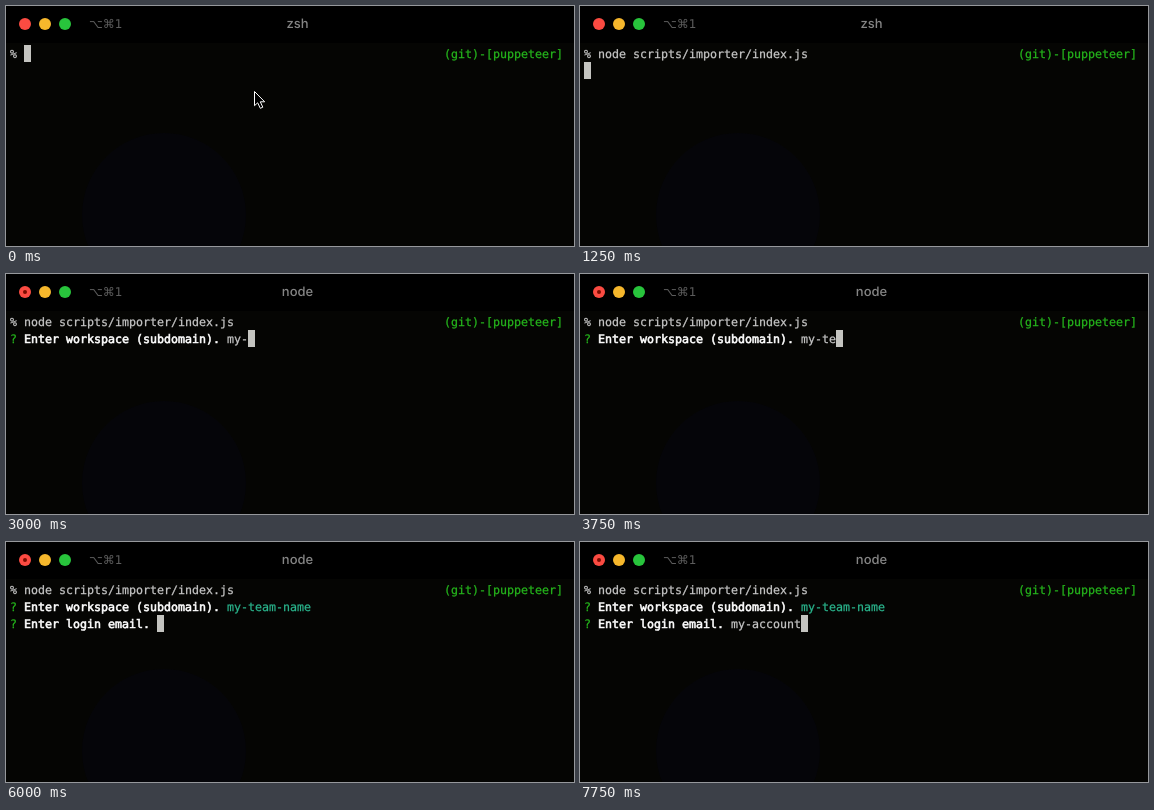
These frames come from a looping animation (568 px wide and 240 px high, 8 s). An HTML page:

```html
<!DOCTYPE html>
<html lang="en">
<head>
<meta charset="utf-8">
<title>Terminal session</title>
<style>
  html, body { margin: 0; width: 100%; height: 100%; overflow: hidden; background: #000; }
  svg { display: block; width: 100vw; height: 100vh; }
  text { white-space: pre; text-rendering: geometricPrecision; }
  .term { font: 11.63px "DejaVu Sans Mono", monospace; }
  .term text { fill: #c7c7c7; stroke: #c7c7c7; stroke-width: .25px; }
  .term .bold { fill: #fff; stroke: #fff; stroke-width: .6px; }
  .term .green { fill: #25b51c; stroke: #25b51c; }
  .term .teal { fill: #2ab48c; stroke: #2ab48c; }
  .bar { font: 500 13px Inter, sans-serif; fill: #858585; text-anchor: middle; }
  .keys { font: 12px "DejaVu Sans", sans-serif; fill: #5c5c5c; }
</style>
</head>
<body>
<svg viewBox="0 0 568 240">
  <rect width="568" height="240" fill="#000"/>
  <rect y="37" width="568" height="203" fill="#050503"/>
  <circle cx="158" cy="209" r="82" fill="#050509"/>
  <circle cx="19" cy="18" r="6" fill="#fb4b42"/>
  <circle id="dot" cx="19" cy="18" r="2" fill="#7a0c00"/>
  <circle cx="39" cy="18" r="6" fill="#f6b72c"/>
  <circle cx="59" cy="18" r="6" fill="#28c43c"/>
  <text class="keys" x="83" y="22">⌥⌘1</text>
  <text class="bar" id="title" x="291.5" y="22"></text>
  <g class="term">
    <text x="4" y="52">%</text>
    <text id="command" x="18" y="52"></text>
    <text class="green" x="438" y="52">(git)-[puppeteer]</text>
    <g id="ask1">
      <text class="green" x="4" y="69">?</text>
      <text class="bold" x="18" y="69">Enter workspace (subdomain).</text>
      <text id="team" x="221" y="69"></text>
    </g>
    <g id="ask2">
      <text class="green" x="4" y="86">?</text>
      <text class="bold" x="18" y="86">Enter login email.</text>
      <text id="login" x="151" y="86"></text>
    </g>
  </g>
  <rect id="caret" width="7" height="17" fill="#c4c4c0"/>
  <path id="pointer" d="M248.5 85.5v14.2l3.2-2.9 2.6 5.5 2.5-1.1-2.5-5.4h4.4z" fill="#000" stroke="#fff"/>
</svg>
<script>
const LOOP = 8000, TICK = 250, COL = 7, ROW = 17;
const $ = id => document.getElementById(id);
const show = (id, on) => $(id).setAttribute("visibility", on ? "visible" : "hidden");

// Characters on screen after each tick, beginning at `start`
const fields = {
  command: { text: "node scripts/importer/index.js", start: 250, counts: [7, 15, 23, 30] },
  team: { text: "my-team-name", start: 2750, counts: [1, 3, 4, 5, 5, 6, 7, 7, 8, 11, 12] },
  login: { text: "my-account", start: 6250, counts: [1, 2, 3, 4, 6, 8, 10] }
};

function type(id, t) {
  const { text, start, counts } = fields[id];
  const i = Math.min(Math.floor((t - start) / TICK), counts.length - 1);
  const n = i < 0 ? 0 : counts[i];
  $(id).textContent = text.slice(0, n);
  return n;
}

function draw(time) {
  const t = time % LOOP;
  const running = t >= 1500, asked = t >= 2000, answered = t >= 5500;
  const command = type("command", t), team = type("team", t), login = type("login", t);

  $("title").textContent = running ? "node" : "zsh";
  show("dot", running);
  show("pointer", t < 250);
  show("ask1", asked);
  show("ask2", answered);
  $("team").setAttribute("class", answered ? "teal" : "");

  let row = 0, col = 2 + command;
  if (t >= 1250) { row = 1; col = asked ? 31 + team : 0; }
  if (answered) { row = 2; col = 21 + login; }
  $("caret").setAttribute("x", 4 + col * COL);
  $("caret").setAttribute("y", 39 + row * ROW);
}

const origin = performance.now();
function frame() {
  draw(performance.now() - origin);
  requestAnimationFrame(frame);
}
frame();
</script>
</body>
</html>
```
